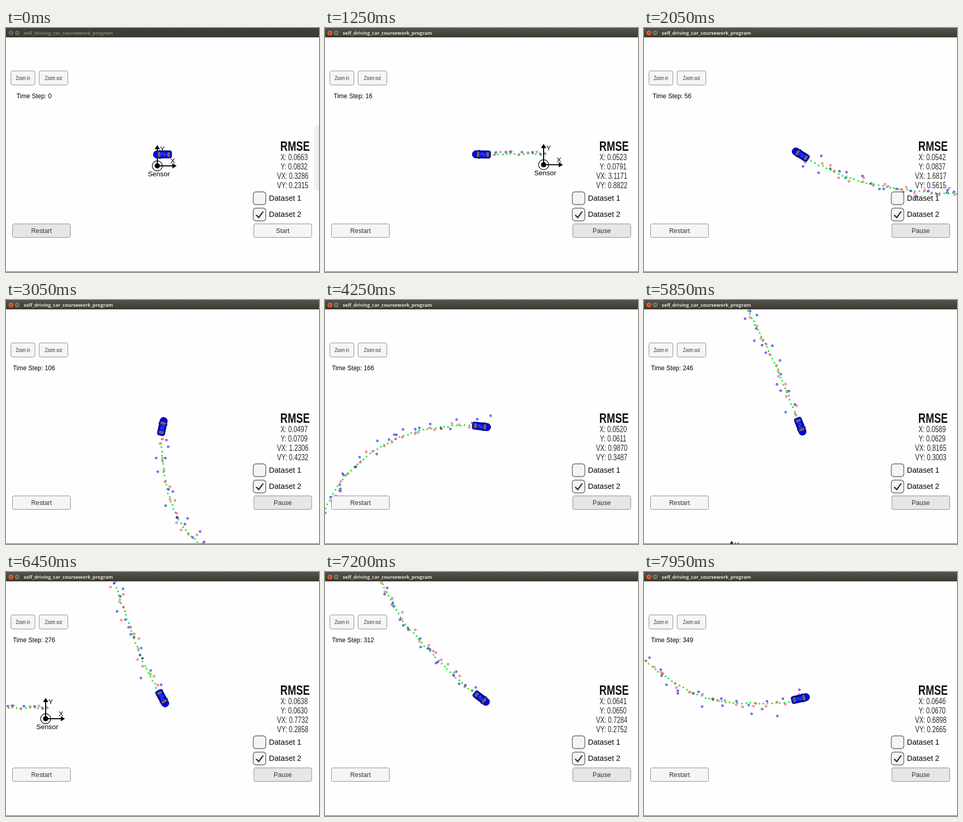
An HTML page with a canvas for the animation above (8000 ms loop, 600 by 469 pixels).

```html
<!DOCTYPE html>
<html lang="en">
<head>
<meta charset="utf-8">
<title>Tracking simulator</title>
<style>
  html, body { margin: 0; width: 100%; height: 100%; overflow: hidden; background: #fefefe; }
  canvas { display: block; }
</style>
</head>
<body>
<canvas id="stage" width="600" height="469"></canvas>
<script>
const ctx = document.getElementById('stage').getContext('2d');
const LOOP = 8000, START = 950, TICK = 200 / 3;
const CAR = { x: 300, y: 243 };
const SANS = '"Liberation Sans", Arial, sans-serif';

// Vehicle route: time step, then position relative to the sensor.
const route = [
  [0, 10, -22], [20, -151, -21], [40, -308, -43], [56, -426, -95], [76, -551, -194],
  [85, -594, -251], [96, -616, -336], [106, -618, -416], [124, -569, -554], [136, -507, -627],
  [148, -423, -674], [160, -329, -691], [166, -281, -689], [176, -203, -676], [194, -78, -609],
  [209, 5, -522], [228, 78, -391], [246, 132, -260], [264, 181, -125], [276, 224, -39],
  [287, 269, 36], [309, 391, 159], [326, 506, 229], [344, 649, 240], [349, 688, 231]
];

// Running errors: time step, then X, Y, VX, VY.
const errors = [
  [8, .06, .09, 4.4, 1.2], [56, .0542, .0837, 1.6817, .5615],
  [106, .0497, .0709, 1.2306, .4232], [166, .052, .0611, .987, .3487],
  [209, .0524, .0631, .8825, .3226], [276, .0638, .063, .7732, .2858],
  [349, .0646, .067, .6898, .2665]
];
const idleErrors = [.0663, .0832, .3286, .2315];

function segment(table, step) {
  let i = 0;
  while (i < table.length - 2 && table[i + 1][0] <= step) i++;
  return i;
}

function slope(i, axis) {
  const a = route[Math.max(i - 1, 0)], b = route[Math.min(i + 1, route.length - 1)];
  return (b[axis] - a[axis]) / (b[0] - a[0]);
}

// Cubic Hermite interpolation along the route
function position(step) {
  const i = segment(route, step), a = route[i], b = route[i + 1];
  const span = b[0] - a[0], u = (step - a[0]) / span;
  const along = axis =>
    (1 + 2 * u) * (1 - u) ** 2 * a[axis] + u * (1 - u) ** 2 * span * slope(i, axis) +
    u * u * (3 - 2 * u) * b[axis] + u * u * (u - 1) * span * slope(i + 1, axis);
  return { x: along(1), y: along(2) };
}

function heading(step) {
  const a = position(Math.max(step - .5, 0)), b = position(step + .5);
  return Math.atan2(b.y - a.y, b.x - a.x);
}

function rmse(step) {
  if (!step) return idleErrors;
  const i = segment(errors, step), a = errors[i], b = errors[i + 1];
  const n = Math.max(step, a[0]), u = (n - a[0]) / (b[0] - a[0]);
  return [1, 2, 3, 4].map(k => {
    const from = a[k] * Math.sqrt(a[0]), to = b[k] * Math.sqrt(b[0]);
    return (from + (to - from) * u) / Math.sqrt(n);
  });
}

function random(n) {
  const v = Math.sin(n * 127.1 + 11.7) * 43758.5453;
  return v - Math.floor(v);
}
const noise = n => (random(n) + random(n + .31) + random(n + .67) - 1.5) * 2;

// Estimate at each step; laser and radar readings take turns.
const trail = Array.from({ length: 350 }, (_, step) => {
  const p = position(step), radar = step % 2 === 0;
  const angle = Math.atan2(p.y, p.x), distance = Math.hypot(p.x, p.y);
  const e1 = noise(step + 1000), e2 = noise(step + 2000);
  const along = 8 * e1, across = (2 + .014 * distance) * e2;
  return {
    radar, angle,
    x: p.x + .7 * noise(step + 3000),
    y: p.y + .7 * noise(step + 4000),
    mx: p.x + (radar ? along * Math.cos(angle) - across * Math.sin(angle) : 4.5 * e1),
    my: p.y + (radar ? along * Math.sin(angle) + across * Math.cos(angle) : 4.5 * e2)
  };
});

function text(str, x, y, size, { color = '#000', align = 'center', weight = '', narrow = 1, font = SANS } = {}) {
  ctx.save();
  ctx.translate(x, y);
  ctx.scale(narrow, 1);
  ctx.font = `${weight} ${size}px ${font}`;
  ctx.textAlign = align;
  ctx.fillStyle = color;
  ctx.fillText(str, 0, 0);
  ctx.restore();
}

function circle(x, y, r) {
  ctx.beginPath();
  ctx.arc(x, y, r, 0, 7);
}

function disc(color, x, y, r) {
  ctx.fillStyle = color;
  circle(x, y, r);
  ctx.fill();
}

function polygon(color, ...points) {
  ctx.fillStyle = color;
  ctx.beginPath();
  for (const [x, y] of points) ctx.lineTo(x, y);
  ctx.fill();
}

function line(color, width, ...points) {
  ctx.strokeStyle = color;
  ctx.lineWidth = width;
  ctx.beginPath();
  for (const [x, y] of points) ctx.lineTo(x, y);
  ctx.stroke();
}

function box(x, y, w, h, radius, fill, stroke, width = 1) {
  ctx.beginPath();
  ctx.roundRect(x, y, w, h, radius);
  ctx.fillStyle = fill;
  ctx.fill();
  if (!stroke) return;
  ctx.strokeStyle = stroke;
  ctx.lineWidth = width;
  ctx.stroke();
}

function drawSensor() {
  ctx.strokeStyle = '#000';
  ctx.lineWidth = 1.2;
  circle(0, 0, 9.7);
  ctx.stroke();
  disc('#000', 0, 0, 5);
  for (const turn of [0, -Math.PI / 2]) {
    ctx.save();
    ctx.rotate(turn);
    const length = turn ? 40 : 37;
    line('#000', 2, [0, 0], [length - 7, 0]);
    polygon('#000', [length - 8, -5], [length, 0], [length - 8, 5]);
    ctx.restore();
  }
  text('Y', 9.7, -28, 13.3);
  text('X', 29.5, -5, 13.3);
  text('Sensor', 3, 20, 13.3);
}

function drawTrail(step) {
  for (const p of trail.slice(1, step + 1)) {
    polygon('#00e81c', [p.x - 2.1, p.y + 1.8], [p.x, p.y - 2], [p.x + 2.1, p.y + 1.8]);
    ctx.strokeStyle = p.radar ? '#0000e0' : '#f0142d';
    ctx.lineWidth = 1;
    circle(p.mx, p.my, 1.8);
    ctx.stroke();
    if (p.radar) {
      line('#0000e0', 1, [p.mx, p.my],
        [p.mx + 2 * Math.cos(p.angle), p.my + 2 * Math.sin(p.angle)]);
    }
  }
}

function drawCar(angle) {
  ctx.save();
  ctx.translate(CAR.x, CAR.y);
  ctx.rotate(angle);
  box(3.5, -8.6, 2.5, 17.2, 1, '#111');
  box(-17.7, -7.2, 35.4, 14.4, [4, 7, 7, 4], '#0404df', '#00007c', .8);
  polygon('#66665f', [4, -4.5], [8, -6], [9.5, 0], [8, 6], [4, 4.5]);
  box(-14.5, -4.5, 5.5, 9, 1.5, '#66665f');
  for (const side of [-1, 1]) line('#15152f', 1, [-13, 5.8 * side], [-7, 5 * side], [8, 6 * side]);
  box(-8, -4.2, 11.5, 8.4, 2, '#0a18f0');
  line('#4d78f0', .8, [-7, 2], [-4, -3], [-2, 2.5], [1, 2.5], [2, -2]);
  ctx.restore();
}

function button(label, x, y, w, h, hovered, size = 12.3, narrow = 1) {
  box(x, y, w, h, 3, hovered ? '#e6e6e6' : '#f5f5f5', '#8c8c8c');
  text(label, x + w / 2, y + h / 2 + size * .36, size, { color: '#323232', narrow });
}

function checkbox(label, y, checked) {
  box(474, y, 24, 24.5, 5, '#f4f4f4', '#666', 1.4);
  if (checked) line('#333', 2.4, [479.5, y + 13], [484.5, y + 18], [493, y + 6.5]);
  text(label, 504, y + 17, 14.5, { align: 'left' });
}

function drawPanel(step, running) {
  button('Zoom in', 9.5, 82.5, 46, 27, false, 10.2, .75);
  button('Zoom out', 63.5, 82.5, 55, 27, false, 10.2, .75);
  text('Time Step: ' + step, 53.7, 135, 12);
  text('RMSE', 554, 236, 26, { weight: 'bold', narrow: .75, color: '#111' });
  const values = rmse(step);
  ['X', 'Y', 'VX', 'VY'].forEach((name, i) =>
    text(`${name}: ${values[i].toFixed(4)}`, i < 2 ? 552.3 : 549.7, 254 + 18 * i, 16.3,
      { narrow: .75, color: '#2a2a2a' }));
  checkbox('Dataset 1', 315, false);
  checkbox('Dataset 2', 346.3, true);
  button('Restart', 12.5, 376.5, 111, 26, !running);
  button(running ? 'Pause' : 'Start', 475, 376.5, 111, 26, running);
}

function drawWindow(active) {
  const bar = ctx.createLinearGradient(0, 0, 0, 18);
  bar.addColorStop(0, active ? '#55524a' : '#403f3a');
  bar.addColorStop(1, active ? '#3b3a35' : '#3a3934');
  ctx.fillStyle = bar;
  ctx.fillRect(0, 0, 600, 18);
  disc(active ? '#e85a36' : '#68665f', 9.5, 9.5, 4.7);
  disc(active ? '#77756c' : '#68665f', 21.5, 9.5, 4.7);
  line('#3a3732', 1, [7.7, 7.7], [11.3, 11.3]);
  line('#3a3732', 1, [11.3, 7.7], [7.7, 11.3]);
  line('#3a3732', 1, [19, 9.5], [24, 9.5]);
  text('self_driving_car_coursework_program', 34, 13, 9.2, {
    align: 'left', weight: 'bold', color: active ? '#e2ded5' : '#85827a',
    font: '"Open Sans", "Noto Sans", sans-serif'
  });
  ctx.fillStyle = '#80577a';
  ctx.fillRect(0, 468, 600, 1);
}

function drawEdgeShade() {
  const shade = ctx.createLinearGradient(586, 0, 600, 0);
  shade.addColorStop(0, 'rgba(0,0,0,0)');
  shade.addColorStop(1, 'rgba(0,0,0,.09)');
  ctx.fillStyle = shade;
  ctx.fillRect(586, 188, 14, 124);
}

function draw(time) {
  const running = time >= START;
  // Ticks at 15 per second, shown on a 50 ms grid
  const tick = Math.ceil((Math.floor((time - START) / 50) * 50 + 50) / TICK - 1e-6) - 1;
  const step = running ? Math.min(349, Math.max(0, Math.floor((10 * tick - 2) / 3))) : 0;
  const here = position(step);

  ctx.fillStyle = '#fefefe';
  ctx.fillRect(0, 0, 600, 469);
  ctx.save();
  ctx.translate(CAR.x - here.x, CAR.y - here.y);
  drawSensor();
  drawTrail(step);
  ctx.restore();
  drawCar(heading(step));
  if (!running) drawEdgeShade();
  drawPanel(step, running);
  drawWindow(running);
}

function frame() {
  draw(performance.now() % LOOP);
  requestAnimationFrame(frame);
}
frame();
</script>
</body>
</html>
```
